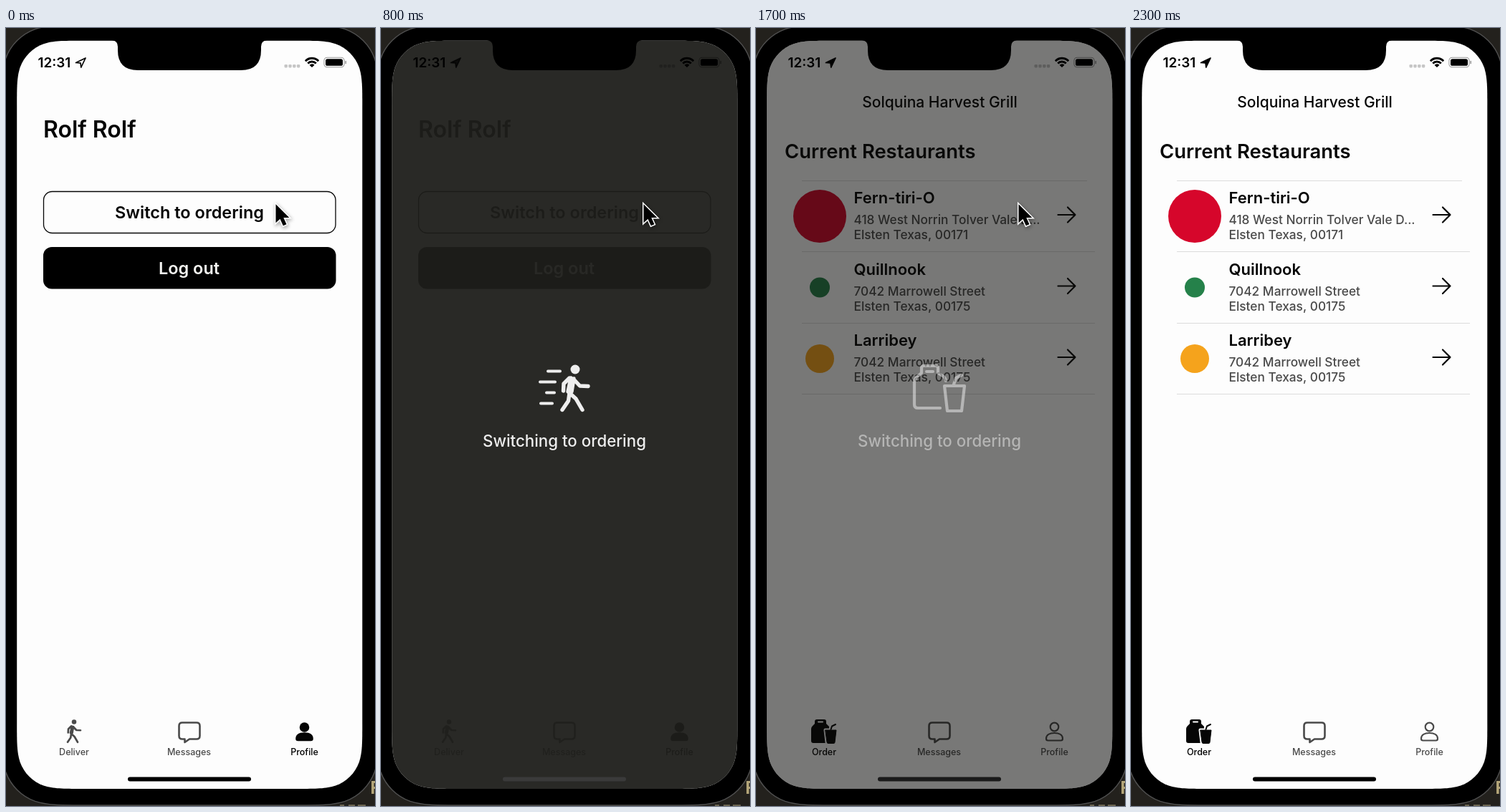
Write an HTML page with a canvas that moves like this. It is 515 by 1087 pixels and loops after 2.9 s.

```html
<!DOCTYPE html>
<html lang="en">
<head>
<meta charset="utf-8">
<title>Switching to ordering</title>
<style>
html, body { margin: 0; width: 100%; height: 100%; overflow: hidden; background: #000; }
canvas { display: block; width: 515px; height: 1087px; }
</style>
</head>
<body>
<canvas id="stage"></canvas>
<script>
const W = 515, H = 1087, LOOP = 2900, STEP = 100;
const PAPER = '#fdfdfd', INK = '#050505', GRAY = '#4a4a4a';
const canvas = document.getElementById('stage');
const ctx = canvas.getContext('2d');
const ratio = window.devicePixelRatio || 1;
canvas.width = W * ratio;
canvas.height = H * ratio;

// Keyed values over time in ms, linear in between
const shadeKeys = [[600, 0], [700, .81], [800, .95], [900, .99], [1100, 1], [1500, 1], [1600, .92], [1700, .55], [1800, .15], [1900, .04], [2000, 0]];
const noticeKeys = [[600, 0], [700, .64], [800, .92], [900, 1], [1500, 1], [1600, .88], [1700, .45], [1800, .13], [1900, .02], [2000, 0]];
const turnKeys = [[1200, 0], [1300, 46], [1400, 95], [1500, 145], [1600, 180]];
const homeKeys = [[600, 0], [700, 50], [900, 66], [1500, 66], [1700, 26], [1800, 0]];
const outlineKeys = [[600, 1], [700, .6], [900, 0]];
const cursorKeys = [[0, 376.5], [100, 373], [200, 368.5], [300, 366.5], [1800, 366.5], [1900, 376], [2000, 408], [2100, 456], [2200, 502], [2300, 540]];

function track(t, keys) {
  if (t <= keys[0][0]) return keys[0][1];
  for (let i = 1; i < keys.length; i++) {
    const [t0, a] = keys[i - 1], [t1, b] = keys[i];
    if (t <= t1) return a + (b - a) * (t - t0) / (t1 - t0);
  }
  return keys[keys.length - 1][1];
}

function text(str, x, y, size, weight, color = INK, align = 'left') {
  ctx.font = `${weight} ${size}px Inter, sans-serif`;
  ctx.textAlign = align;
  ctx.fillStyle = color;
  ctx.fillText(str, x, y);
}

function box(x, y, w, h, r, fill, line, width = 1) {
  ctx.beginPath();
  ctx.roundRect(x, y, w, h, r);
  if (fill) { ctx.fillStyle = fill; ctx.fill(); }
  if (line) { ctx.strokeStyle = line; ctx.lineWidth = width; ctx.stroke(); }
}

// Rectangle whose corners ease into the sides
function smoothBox(x, y, w, h, r) {
  const path = new Path2D();
  const corner = (cx, cy, dx, dy, flip) => {
    const at = (a, b) => flip ? [cx + dx * b * r, cy + dy * a * r] : [cx + dx * a * r, cy + dy * b * r];
    path.lineTo(...at(0, 1.528));
    path.bezierCurveTo(...at(0, 1.088), ...at(0, .868), ...at(.075, .631));
    path.bezierCurveTo(...at(.169, .372), ...at(.372, .169), ...at(.631, .075));
    path.bezierCurveTo(...at(.868, 0), ...at(1.088, 0), ...at(1.528, 0));
  };
  corner(x, y, 1, 1, false);
  corner(x + w, y, -1, 1, true);
  corner(x + w, y + h, -1, -1, false);
  corner(x, y + h, 1, -1, true);
  path.closePath();
  return path;
}

function disc(x, y, r, fill) {
  ctx.beginPath();
  ctx.arc(x, y, r, 0, 7);
  ctx.fillStyle = fill;
  ctx.fill();
}

function stroke(path, color, width) {
  ctx.strokeStyle = color;
  ctx.lineWidth = width;
  ctx.lineCap = ctx.lineJoin = 'round';
  ctx.stroke(path);
}

function fill(path, color) {
  ctx.fillStyle = color;
  ctx.fill(path);
}

const shapes = {
  body: smoothBox(-6, -4, 526, 1090, 74),
  screen: smoothBox(15.2, 17.7, 482.1, 1045.3, 59),
  limbs: new Path2D('M263 489L255 497L254.500 507M270 492L277.500 500L289 500.500M265 489L261 508L272 518L281 533.500M269 490L266 508M264 489.500L269 491M263 510L261.500 521L253 533.500'),
  dashes: new Path2D('M233 479.500H250M222 494.500H243M231 509.500H242M223 524.500H239'),
  bag: new Path2D('M257 531H226Q221 531 221 526V495Q221 491 224 488L231 482V475Q231 472 234 472H251Q254 472 254 475V482L262 487Q265 490 265 493M238 480H247M263 500H291L287 535H267ZM276 498L279 489L287 485'),
  bagSolid: new Path2D('M82 969Q82 966 85 966H95Q98 966 98 969V972L102 976V999H80Q77 999 77 996V979Q77 977 79 975L82 972Z'),
  cup: new Path2D('M97 981H112L110 998Q110 999.500 108 999.500H101Q99 999.500 99 998Z'),
  straw: new Path2D('M104.500 980L106 975.500L111 973'),
  bubble: new Path2D('M246 970.500H266Q270.500 970.500 270.500 975V989Q270.500 993.500 266 993.500H256L249.500 998V993.500H246Q241.500 993.500 241.500 989V975Q241.500 970.500 246 970.500Z'),
  torso: new Path2D('M405 993C405 987.500 410 985 416.500 985S428 987.500 428 993Q428 995.500 425.500 995.500H407.500Q405 995.500 405 993Z'),
  pointer: new Path2D('M97.500 48.500L111 42L104.800 55L104 48.900Z'),
  arrow: new Path2D('M0 0H24M13.500 -10.500L24 0L13.500 10.500'),
  cursor: new Path2D('M0 0V26L6 20.500L10.300 30L15 27.900L10.800 18.600H18.800Z'),
  notch: new Path2D('M148 17Q156 18 156 26V31Q156 59 184 59H328Q356 59 356 31V26Q356 18 364 17Z')
};

function walker(color, alpha = 1) {
  ctx.globalAlpha = alpha;
  disc(271, 477, 6.5, color);
  stroke(shapes.limbs, color, 5.4);
  ctx.globalAlpha = 1;
}

function tabLabel(str, x, active) {
  text(str, x, 1016, 12.5, 500, active ? '#000' : GRAY, 'center');
}

function messagesTab() {
  stroke(shapes.bubble, GRAY, 2.6);
  tabLabel('Messages', 255.5, false);
}

function profileTab(active) {
  if (active) {
    disc(416.5, 977, 6.8, INK);
    fill(shapes.torso, INK);
    stroke(shapes.torso, INK, 1.6);
  } else {
    ctx.beginPath();
    ctx.arc(416.5, 976.5, 5.8, 0, 7);
    ctx.strokeStyle = GRAY;
    ctx.lineWidth = 2.2;
    ctx.stroke();
    stroke(shapes.torso, GRAY, 2.2);
  }
  tabLabel('Profile', 416.5, active);
}

function profilePage() {
  text('Rolf Rolf', 52, 153, 32, 600);
  box(52.5, 228.5, 407.5, 58, 12, null, INK, 1.3);
  text('Switch to ordering', 256, 266, 23.5, 600, INK, 'center');
  box(52, 306, 408.5, 58.5, 12, '#000');
  text('Log out', 255.5, 344, 23.5, 600, '#f5f5f2', 'center');

  ctx.save();
  ctx.translate(95, 969.5);
  ctx.scale(.5, .5);
  ctx.translate(-271, -477);
  walker(GRAY);
  ctx.restore();
  tabLabel('Deliver', 95, false);
  messagesTab();
  profileTab(true);
}

const places = [
  { name: 'Fern-tiri-O', lines: ['418 West Norrin Tolver Vale D...', 'Elsten Texas, 00171'], color: '#d6062b', y: 263, r: 37 },
  { name: 'Quillnook', lines: ['7042 Marrowell Street', 'Elsten Texas, 00175'], color: '#25814a', y: 362.5, r: 14 },
  { name: 'Larribey', lines: ['7042 Marrowell Street', 'Elsten Texas, 00175'], color: '#f5a31c', y: 462, r: 20 }
];

function rule(y, end) {
  ctx.fillStyle = '#dcdcdc';
  ctx.fillRect(64, y, end - 64, 1);
}

function orderPage() {
  text('Solquina Harvest Grill', 256.5, 110.5, 21, 500, INK, 'center');
  text('Current Restaurants', 40, 182, 27.4, 600);
  rule(213, 462);
  places.forEach((place, i) => {
    const y = i * 99.5;
    disc(89, place.y, place.r, place.color);
    text(place.name, 136.5, 245 + y, 22, 600);
    place.lines.forEach((line, n) => text(line, 136.5, 274 + y + n * 21, 17.3, 500, GRAY));
    ctx.save();
    ctx.translate(421.5, 261 + y);
    stroke(shapes.arrow, INK, 2.2);
    ctx.restore();
    rule(Math.floor(312.5 + y), 473);
  });

  fill(shapes.bagSolid, INK);
  box(86, 968.5, 8, 2, 1, PAPER);
  stroke(shapes.cup, PAPER, 5);
  fill(shapes.cup, INK);
  stroke(shapes.cup, INK, 1);
  stroke(shapes.straw, INK, 2);
  tabLabel('Order', 95, true);
  messagesTab();
  profileTab(false);
}

function shade(amount) {
  if (!amount) return;
  const tone = amount ** 1.7;
  ctx.fillStyle = `rgba(${33 * tone}, ${33 * tone}, ${29 * tone}, ${amount})`;
  ctx.fillRect(0, 0, W, H);
}

function notice(t) {
  const alpha = track(t, noticeKeys);
  if (!alpha) return;
  const angle = track(t, turnKeys);
  ctx.save();
  ctx.translate(256, 0);
  ctx.scale(Math.abs(Math.cos(angle * Math.PI / 180)), 1);
  ctx.translate(-256, 0);
  ctx.globalAlpha = alpha;
  if (angle < 90) {
    stroke(shapes.dashes, '#fff', 4);
    walker('#fff', alpha);
  } else {
    stroke(shapes.bag, '#fff', 4.2);
  }
  ctx.restore();
  ctx.globalAlpha = alpha;
  text('Switching to ordering', 256, 585, 22.3, 500, '#fff', 'center');
  ctx.globalAlpha = 1;
}

function statusBar(t) {
  text('12:31', 44.5, 55, 18.9, 600, '#000');
  const outline = track(t, outlineKeys);
  ctx.globalAlpha = outline;
  stroke(shapes.pointer, '#000', 1.7);
  ctx.globalAlpha = 1 - outline;
  fill(shapes.pointer, '#000');
  stroke(shapes.pointer, '#000', 1.7);
  ctx.globalAlpha = 1;

  for (let i = 0; i < 4; i++) box(388.5 + i * 5.8, 51, 4.4, 4.4, 1.3, 'rgba(0,0,0,.22)');

  ctx.strokeStyle = '#000';
  ctx.lineCap = 'butt';
  for (const [r, w] of [[12.7, 2.9], [8, 2.9], [2.4, 4.8]]) {
    ctx.beginPath();
    ctx.arc(427, 55, r, -Math.PI * .755, -Math.PI * .245);
    ctx.lineWidth = w;
    ctx.stroke();
  }

  box(444, 41.2, 28, 13.6, 4.2, null, 'rgba(0,0,0,.4)', 1.1);
  box(446, 43.2, 24, 9.6, 2.6, '#000');
  box(473.4, 45.7, 1.6, 4.6, 1, 'rgba(0,0,0,.4)');

  const v = track(t, homeKeys);
  box(170, 1046.5, 172, 6, 3, `rgb(${v}, ${v}, ${v})`);
}

function phoneBody() {
  ctx.fillStyle = '#23211d';
  ctx.fillRect(0, 0, W, H);
  ctx.fillStyle = '#6b6450';
  for (const [x, w] of [[466, 6], [478, 9], [491, 11]]) ctx.fillRect(x, 1085, w, 2);
  text('F', 508.5, 1070, 24, 700, '#b5a77a');
  fill(shapes.body, '#000');
  stroke(shapes.body, '#505050', 1.4);
}

function cursor(t) {
  const x = track(t, cursorKeys);
  if (x > W) return;
  ctx.save();
  ctx.translate(x, 246.3);
  ctx.shadowColor = 'rgba(0,0,0,.4)';
  ctx.shadowBlur = 5 * ratio;
  ctx.shadowOffsetX = ratio;
  ctx.shadowOffsetY = 2 * ratio;
  ctx.lineJoin = 'miter';
  ctx.lineWidth = 3;
  ctx.strokeStyle = '#fff';
  ctx.stroke(shapes.cursor);
  ctx.shadowColor = 'transparent';
  fill(shapes.cursor, '#000');
  ctx.restore();
}

function draw(t) {
  ctx.setTransform(ratio, 0, 0, ratio, 0, 0);
  phoneBody();
  ctx.save();
  ctx.clip(shapes.screen);
  ctx.fillStyle = PAPER;
  ctx.fillRect(0, 0, W, H);
  if (t < 1200) profilePage(); else orderPage();
  shade(track(t, shadeKeys));
  notice(t);
  statusBar(t);
  ctx.restore();
  fill(shapes.notch, '#000');
  cursor(t);
}

const start = performance.now();
function tick() {
  const t = (performance.now() - start) % LOOP;
  draw(Math.floor(t / STEP) * STEP);
  requestAnimationFrame(tick);
}
tick();
</script>
</body>
</html>
```
